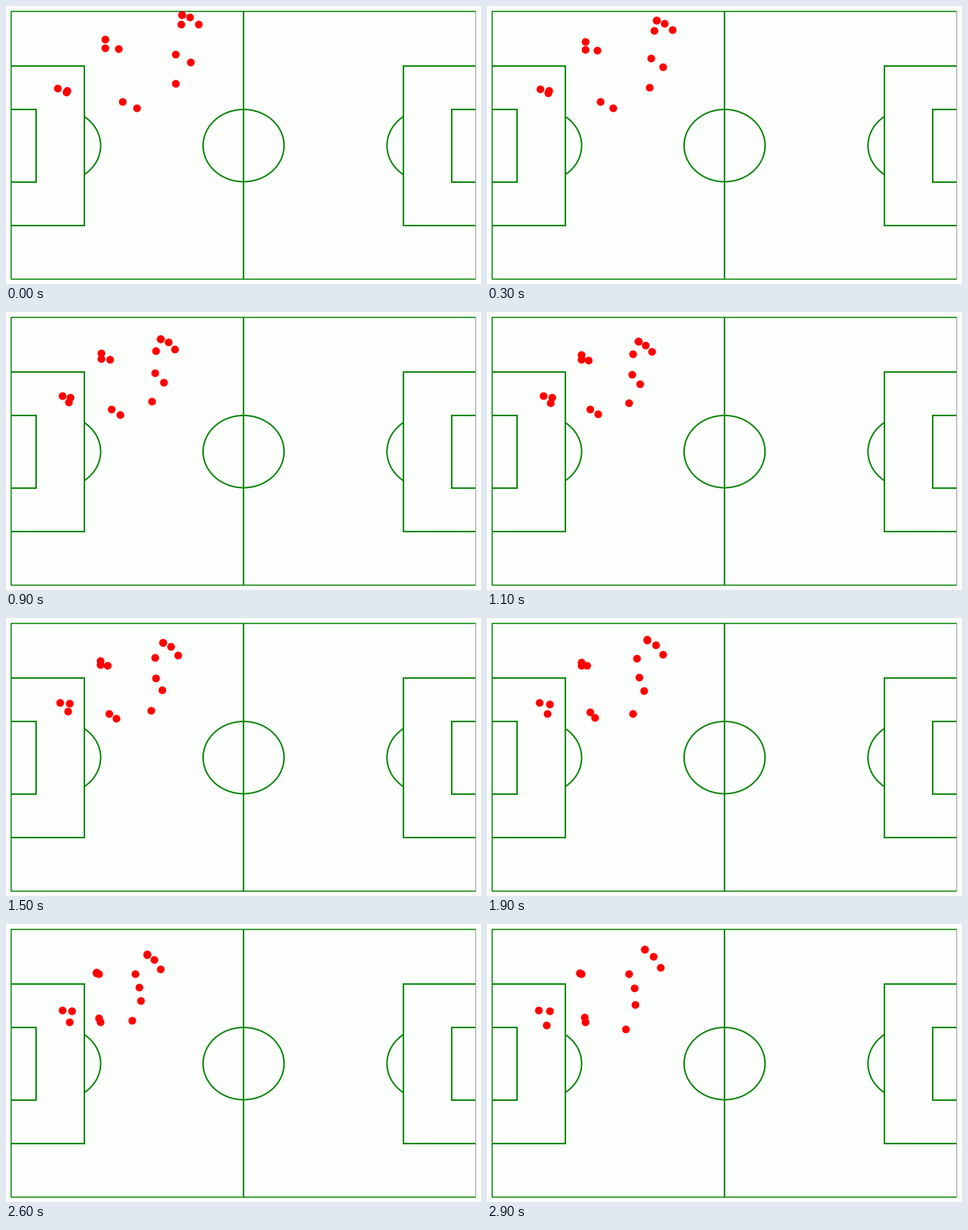
Animation of 600x352 px, one loop 3 s. Source, as a matplotlib script:

```python
import numpy as np
import matplotlib.pyplot as plt
from matplotlib.animation import FuncAnimation
from matplotlib.patches import Arc, Rectangle

W, H, DPI = 600, 352, 100
FRAMES, STEP = 30, 100
PT = 72 / DPI  # points per pixel

# Pitch of 105 x 68 metres; the outer lines are trimmed by the view
MID_X, MID_Y = 300.4, 176.75
SX, SY = 5.59, 5.0
LEFT, TOP, RIGHT, BOTTOM = 6.5, 6.8, 593.3, 345.9
GREEN, GREY = "#008000", "#969896"

# Each line of players: first formation, last formation, share of the pull in x and y
LINES = [
    ([(221.6, 11.2), (221.6, 11.2), (232.1, 14.4), (242.6, 22.5),
      (220.8, 22.5), (214.4, 60.5), (232.6, 71.2), (214.4, 98.2)],
     [(198.6, 32.2), (199.2, 31.6), (210.1, 41), (218.9, 54.8),
      (178.6, 63), (186.1, 81.4), (187.3, 102.2), (174.7, 133)],
     (-1, 0.7)),
    ([(125.4, 41.5), (125.4, 53), (142.4, 54.2)],
     [(117.3, 62.4), (117.3, 62.4), (118.5, 62.8)],
     (-0.17, 0.2)),
    ([(146.9, 120.5), (165.3, 129.2)],
     [(123.3, 117.9), (124.2, 123.6)],
     (-0.4, 0.15)),
    ([(65.4, 104), (75.6, 108.5), (76.9, 106.5)],
     [(64.8, 108.5), (75.4, 127.5), (78.6, 109.8)],
     (0.22, 0)),
]

# Two runs towards goal, each followed by a retreat
PULL_TIMES = np.array([0, 600, 1100, 1500, 1900, 2600, 2900])
PULL = np.array([0, 11, 22, 12, 4.5, 22.6, 0])
PULL_SLOPES = np.gradient(PULL, PULL_TIMES)
SQUEEZE = 0.007


def pull_at(t):
    """Smooth Hermite curve through the pull values."""
    k = min(np.searchsorted(PULL_TIMES, t, side="right") - 1, len(PULL) - 2)
    span = PULL_TIMES[k + 1] - PULL_TIMES[k]
    u = (t - PULL_TIMES[k]) / span
    ease = u * u * (3 - 2 * u)
    bend = PULL_SLOPES[k] * u * (1 - u) ** 2 - PULL_SLOPES[k + 1] * u * u * (1 - u)
    return PULL[k] + (PULL[k + 1] - PULL[k]) * ease + bend * span


def players_at(frame):
    """Lines drift to their last formation; a pull shifts and tightens them."""
    u = frame / (FRAMES - 1)
    pull = pull_at(frame * STEP)
    spots = []
    for first, last, (px, py) in LINES:
        shape = (1 - u) * np.array(first) + u * np.array(last)
        centre = shape.mean(axis=0)
        shift = pull * np.array([px, py * (1 - u * u)])
        spots.append(centre + shift + (shape - centre) * (1 - SQUEEZE * pull))
    return np.vstack(spots)


fig = plt.figure(figsize=(W / DPI, H / DPI), dpi=DPI, facecolor="white")
ax = fig.add_axes([0, 0, 1, 1])
ax.set_xlim(0, W)
ax.set_ylim(H, 0)
ax.axis("off")


def line(xs, ys, width=1.8, color=GREEN, snap=True):
    ax.plot(xs, ys, color=color, lw=width * PT, solid_capstyle="butt",
            solid_joinstyle="miter", snap=snap, zorder=2)


def area(side, depth, height):
    """Three sides of an area; side is -1 for the left goal, 1 for the right."""
    edge = LEFT if side < 0 else RIGHT
    x = MID_X + side * (52.5 - depth) * SX
    half = height / 2 * SY
    line([edge, x, x, edge], [MID_Y - half, MID_Y - half, MID_Y + half, MID_Y + half])


def arc(x, start=0, end=360):
    ax.add_patch(Arc((x, MID_Y), 18.3 * SX, 18.3 * SY, theta1=start, theta2=end,
                     color=GREEN, lw=1.8 * PT, zorder=2))


ax.add_patch(Rectangle((LEFT, TOP), RIGHT - LEFT, BOTTOM - TOP, fc="#fbfefb", lw=0))
line([RIGHT, RIGHT], [TOP, BOTTOM], 1, GREY, snap=False)
line([RIGHT, LEFT, LEFT, RIGHT], [TOP, TOP, BOTTOM, BOTTOM], 1.4, snap=False)
line([MID_X, MID_X], [TOP, BOTTOM])
arc(MID_X - 0.3)

# The penalty arcs end where they meet the area's edge
reach = np.degrees(np.arctan2(np.sqrt(9.15**2 - 5.5**2) * SY, 5.5 * SX))
for side, facing in ((-1, 0), (1, 180)):
    area(side, 16.5, 40.32)
    area(side, 5.5, 18.32)
    arc(MID_X + side * 41.5 * SX, facing - reach, facing + reach)

dots = ax.scatter(*players_at(0).T, s=(9.8 * PT) ** 2, c="red", linewidths=0, zorder=3)


def update(frame):
    dots.set_offsets(players_at(frame))
    return (dots,)


anim = FuncAnimation(fig, update, frames=FRAMES, interval=STEP, repeat=True,
                     repeat_delay=0, blit=False)
plt.show()
```
